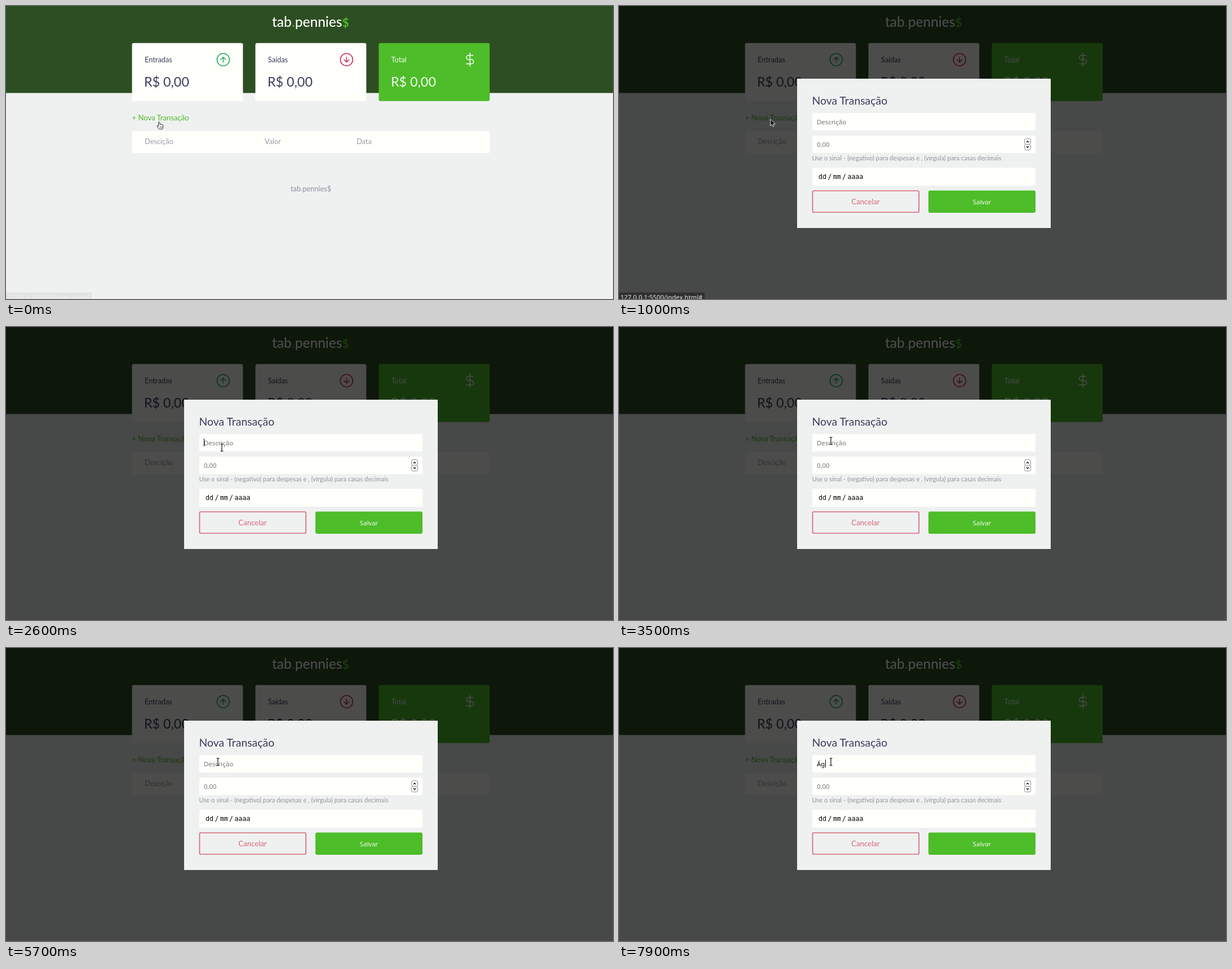
Recreate the animation shown at these times as an HTML page. Size 1077 by 520 pixels, loop 8 s.

```html
<!DOCTYPE html>
<html lang="pt-BR">
<head>
<meta charset="utf-8">
<title>Nova Transação</title>
<style>
  html, body { margin: 0; width: 1077px; height: 520px; overflow: hidden; background: #eff1f1; }
  svg { display: block; font: 12.8px Lato, "Open Sans", sans-serif; }
  .ink { fill: #393e5a; }
  .paper { fill: #fffffc; }
  .muted { fill: #999fa6; }
  .money { font-size: 23.3px; }
  .green { fill: #4dbd29; }
  .white { fill: #f4faf2; }
  .icon { fill: none; stroke-width: 1.5; stroke-linecap: round; stroke-linejoin: round; }
  .field { font: 11.4px "Noto Sans", "Open Sans", sans-serif; }
  .hint { fill: #757575; }
  .mono { font: 11.6px "DejaVu Sans Mono", monospace; }
</style>
</head>
<body>
<svg width="1077" height="520" viewBox="0 0 1077 520">
  <rect width="1077" height="154.4" fill="#2d4e22"/>
  <text x="472" y="37" font-size="24.5" font-weight="500" fill="#fff">tab<tspan class="green">.</tspan>pennies<tspan class="green" font-size="21" font-weight="700">$</tspan></text>

  <g class="paper">
    <rect x="223.600" y="65.700" width="196.800" height="103" rx="3"/>
    <rect x="442.500" y="65.700" width="196.800" height="103" rx="3"/>
    <rect x="661.400" y="65.700" width="196.800" height="103" rx="3" class="green"/>
    <rect x="223.600" y="222" width="634.600" height="39" rx="3"/>
  </g>
  <g class="ink">
    <text x="246" y="99.500">Entradas</text>
    <text x="464.800" y="99.500">Saídas</text>
    <text x="683.500" y="99.500" class="white">Total</text>
    <g class="money">
      <text x="245" y="143">R$ 0,00</text>
      <text x="464" y="143">R$ 0,00</text>
      <text x="683" y="143" class="white">R$ 0,00</text>
    </g>
  </g>
  <g class="icon">
    <g transform="translate(385.400 95.200)" stroke="#23aa5c">
      <circle r="11"/><path d="M0 4.500V-4.500M-4.500 0 0-4.500 4.500 0"/>
    </g>
    <g transform="translate(604.300 95.200)" stroke="#cc2450">
      <circle r="11"/><path d="M0-4.500V4.500M-4.500 0 0 4.500 4.500 0"/>
    </g>
    <path transform="translate(810.400 82.300) scale(1.07)" stroke="#f4faf2"
      d="M12 1V23M17 5H9.500a3.500 3.500 0 0 0 0 7h5a3.500 3.500 0 0 1 0 7H6"/>
  </g>

  <text id="link" x="223.500" y="203" font-size="13.1">+ Nova Transação</text>
  <g class="muted">
    <text x="246" y="245">Descição</text>
    <text x="459" y="245">Valor</text>
    <text x="622" y="245">Data</text>
  </g>
  <text x="505" y="328.500" fill="#8b91a1">tab.pennies$</text>

  <g id="modal">
    <rect width="1077" height="520" opacity=".7"/>
    <rect x="316" y="129" width="450" height="265" fill="#eff1f1"/>
    <text x="342.500" y="175" font-size="19.4" class="ink">Nova Transação</text>
    <g class="paper">
      <rect x="343" y="190" width="396" height="31" rx="2"/>
      <rect x="343" y="230" width="396" height="31" rx="2"/>
      <rect x="343" y="287" width="396" height="32" rx="2"/>
    </g>
    <g class="field">
      <text id="entry" x="351" y="209.500"></text>
      <text x="351" y="250" class="hint">0,00</text>
    </g>
    <rect id="caret" y="198" width="1" height="14"/>
    <g fill="#fff" stroke="#888">
      <rect x="719.500" y="235.500" width="11" height="10" rx="3"/>
      <rect x="719.500" y="245.500" width="11" height="10" rx="3"/>
    </g>
    <path d="M723 242 725 239.700 727 242M723 249 725 251.300 727 249" fill="none" stroke="#111" stroke-width="1.300"/>
    <text x="342.500" y="273.500" font-size="11.2" fill="#8f9499">Use o sinal - (negativo) para despesas e , (vírgula) para casas decimais</text>
    <text y="307" class="mono"><tspan x="354">dd</tspan><tspan x="370.500">/</tspan><tspan x="379.700">mm</tspan><tspan x="396">/</tspan><tspan x="405.500">aaaa</tspan></text>
    <rect x="343.500" y="328" width="188.700" height="38" rx="2" fill="none" stroke="#d9697b" stroke-width="1.700"/>
    <text x="437.500" y="351.500" font-size="13.2" text-anchor="middle" fill="#d9697b">Cancelar</text>
    <rect x="549" y="327.500" width="190" height="39.500" rx="3" class="green"/>
    <text x="644" y="352" class="field white" text-anchor="middle">Salvar</text>
  </g>

  <g id="status">
    <path d="M0 508.500H149Q152 508.500 152 511.500V520H0Z" fill="#2c2c2c"/>
    <text x="2.500" y="521" class="field" fill="#fff">127.0.0.1:5500/index.html#</text>
  </g>

  <g id="cursor">
    <g id="hand" transform="translate(-1 0) scale(.92)" fill="#fff" stroke="#111" stroke-linejoin="round">
      <path d="M-.5 1.500Q.7-.3 2 1.500V5.500Q3.500 4.500 4.300 6Q5.700 5 6.500 6.500Q8.300 6 8.500 8V11L7.300 14.500H.7L-3.300 9.500Q-3.500 7.500-1.800 8L-.5 9.200Z"/>
      <path d="M2.300 9.500V12M4.300 9.500V12M6.300 9.500V12" stroke-width=".8"/>
    </g>
    <path id="arrow" d="M.8 1V12.500L3.400 10.200 5.300 14 7.200 13.100 5.400 9.300H9Z" fill="#000" stroke="#fff" stroke-width=".9"/>
    <g id="beam" fill="none">
      <path id="stem" d="M-2.500-6.500Q0-6.500 0-5V5Q0 6.500-2.500 6.500M2.500-6.500Q0-6.500 0-5M0 5Q0 6.500 2.500 6.500"/>
      <use href="#stem" stroke="#fff" stroke-width="2.200"/>
      <use href="#stem" stroke="#111" stroke-width="1.200"/>
    </g>
  </g>
</svg>
<script>
  const LOOP = 8000, TICK = 100;
  const $ = id => document.getElementById(id);
  const show = (id, on) => $(id).style.display = on ? "" : "none";
  const within = (t, from, to) => t >= from && t < to;

  // Pointer hot spot: time, x, y
  const path = [
    [0, 272, 205], [300, 272, 205], [700, 268, 200], [1300, 268, 200],
    [1700, 423, 271], [2000, 397, 219], [2200, 397, 219], [2600, 383, 214],
    [2900, 380, 205], [3100, 380, 205], [3500, 376, 202], [LOOP, 376, 202]
  ];

  function pointAt(t) {
    const i = path.findIndex(p => p[0] > t);
    const [t0, x0, y0] = path[i - 1], [t1, x1, y1] = path[i];
    const k = (t - t0) / (t1 - t0);
    return [x0 + (x1 - x0) * k, y0 + (y1 - y0) * k];
  }

  function statusOpacity(t) {
    if (t < 200) return .06;
    if (t < 1000) return 1;
    if (t < 1100) return .85;
    return t < 1200 ? .4 : 0;
  }

  function draw(t) {
    const [x, y] = pointAt(t);
    const open = t >= 1000, typed = t < 5900 ? "" : t < 7900 ? "Á" : "Ág";

    show("modal", open);
    $("link").setAttribute("fill", within(t, 200, 1000) ? "#3dd705" : "#4dbd29");
    $("status").setAttribute("opacity", statusOpacity(t));

    $("entry").textContent = typed || "Descrição";
    $("entry").setAttribute("fill", typed ? "#000" : "#757575");
    $("caret").setAttribute("x", [351, 359, 366][typed.length]);
    show("caret", within(t, 2400, 3500) || within(t, 4500, 5700) || within(t, 5900, 6900) || t >= 7900);

    $("cursor").setAttribute("transform", `translate(${x} ${y})`);
    show("hand", !open);
    show("arrow", open && x < 342);
    show("beam", open && x >= 342);
  }

  const start = performance.now();
  function frame() {
    const t = (performance.now() - start) % LOOP;
    draw(Math.floor(t / TICK) * TICK);
    requestAnimationFrame(frame);
  }
  frame();
</script>
</body>
</html>
```
